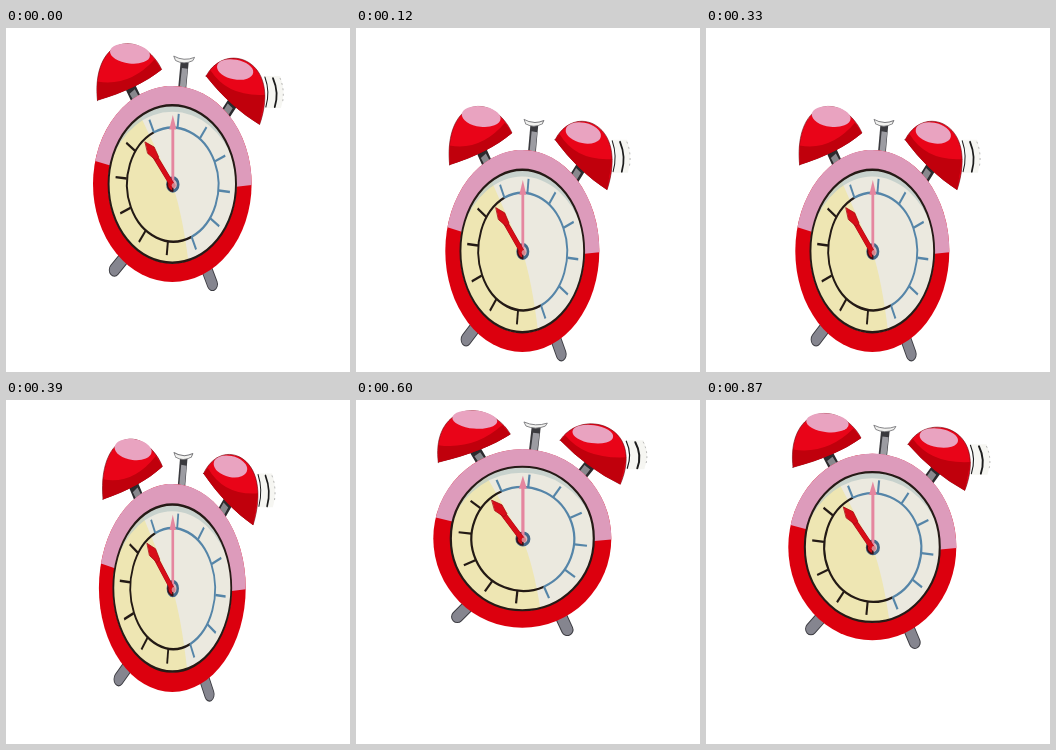
Animation, 344 px wide and 344 px high, one loop 0.9 s. Source, as an HTML page:

```html
<!DOCTYPE html>
<html lang="en">
<head>
<meta charset="utf-8">
<title>Bouncing alarm clock</title>
<style>
  html, body { margin: 0; width: 100%; height: 100%; overflow: hidden; background: #fff; }
  svg { display: block; width: 100vw; height: 100vh; }
</style>
</head>
<body>
<svg viewBox="0 0 344 344">
  <g id="clock" stroke-linecap="round" stroke-linejoin="round">
    <!-- feet -->
    <g fill="none">
      <path d="M-54 67L-65 78M38 76L45 91" stroke="#3c3c42" stroke-width="12.5"/>
      <path d="M-54 67L-65 78M38 76L45 91" stroke="#85858f" stroke-width="10.5"/>
    </g>

    <!-- bell stems and top post -->
    <g fill="none" stroke-linecap="butt">
      <path d="M-47 -88L-37 -71M68 -74L55 -58" stroke="#2b2b2e" stroke-width="11.5"/>
      <path d="M-45 -84L-36 -71M65 -71L55 -58" stroke="#88888d" stroke-width="7"/>
      <path d="M14 -112L11 -86" stroke="#3a3a3e" stroke-width="9"/>
      <path d="M14 -105L11.5 -86" stroke="#9c9ca2" stroke-width="6.5"/>
    </g>
    <path d="M2 -116Q13 -111 25 -115L23 -112Q13 -108 4 -112Z" fill="#f2f2f0" stroke="#77777a" stroke-width=".9"/>

    <!-- ringing marks -->
    <path d="M103 -98H121Q128 -84 122 -69H105Q113 -84 103 -98Z" fill="#f6f6f2"/>
    <g fill="none" stroke="#1c1c1c">
      <path d="M104 -97Q110 -84 105 -70" stroke-width="1.2"/>
      <path d="M113 -96Q120 -83 115 -70" stroke-width="2"/>
      <path d="M121 -96Q127 -84 123 -72" stroke="#888" stroke-width=".6" stroke-dasharray="1 4"/>
    </g>

    <!-- bells -->
    <g stroke="#6c000a" stroke-width=".6" fill="#e90418">
      <path d="M-84 -76C-87 -98 -80 -117 -63 -125C-43 -133 -21 -120 -12 -104Q-38 -87 -84 -76Z"/>
      <path d="M38 -98C47 -112 65 -118 82 -112C103 -104 110 -82 98 -54Q65 -70 38 -98Z"/>
    </g>
    <path d="M-84 -76L-84 -93Q-48 -88 -20 -113L-12 -104Q-38 -87 -84 -76Z" fill="#c0000c"/>
    <path d="M38 -98L43 -103Q62 -79 104 -81L98 -54Q65 -70 38 -98Z" fill="#c0000c"/>
    <g fill="#e9a3c0">
      <ellipse cx="-47.5" cy="-118.5" rx="22.5" ry="9" transform="rotate(5 -47.5 -118.5)"/>
      <ellipse cx="70.5" cy="-104" rx="20.5" ry="9" transform="rotate(8 70.5 -104)"/>
    </g>

    <!-- body -->
    <circle r="89" fill="#dc000e"/>
    <path d="M0 0L-86.5 -21A89 89 0 0 1 89 1L72 2.5Z" fill="#dd9bbb"/>

    <!-- face -->
    <circle r="72" fill="#ebe9df"/>
    <path d="M0 0Q11 26 18 69.7A72 72 0 0 1 -36 -62.3Z" fill="#eee6b3"/>
    <path d="M-69 -20A72 72 0 0 1 69 -20A75 75 0 0 0 -69 -20Z" fill="#b9c9c6" opacity=".7"/>
    <circle r="71.5" fill="none" stroke="#261a16" stroke-width="2.2"/>
    <g id="dial" fill="none" stroke-width="2.2" stroke-linecap="butt" transform="translate(.5 .5)"></g>

    <!-- hub and hands -->
    <g transform="translate(.6 .4)">
      <circle r="6" fill="#d9b9bd" stroke="#44698a" stroke-width="3"/>
      <path d="M0 -6A6 6 0 0 0 0 6Z" fill="#d50d18" stroke="#3b1014" stroke-width="1.6"/>
      <path d="M0 0V-52" stroke="#e5869f" stroke-width="3.2"/>
      <path d="M0 -63L4 -50H-4Z" fill="#e5869f"/>
      <path d="M-1 0L-22 -28" stroke="#a80a14" stroke-width="5.4"/>
      <path d="M-1 0L-22 -28" stroke="#d80d18" stroke-width="4.4"/>
      <path d="M-31 -38.5L-21 -34L-16 -25L-19 -22L-28 -28Z" fill="#d80d18" stroke="#a80a14" stroke-width=".8"/>
      <circle cx="1" cy="1" r="2.3" fill="#d8838c"/>
    </g>
  </g>
</svg>
<script>
const clock = document.getElementById('clock');
const dial = document.getElementById('dial');
const BLUE = '#5585a8', BLACK = '#231a15';

function polar(r, deg) {
  const a = deg * Math.PI / 180;
  return `${(r * Math.sin(a)).toFixed(2)} ${(-r * Math.cos(a)).toFixed(2)}`;
}

function stroke(d, color) {
  const p = document.createElementNS('http://www.w3.org/2000/svg', 'path');
  p.setAttribute('d', d);
  p.setAttribute('stroke', color);
  dial.append(p);
}

const arc = (a, b) => `M${polar(52, a)}A52 52 0 0 1 ${polar(52, b)}`;
stroke(arc(-24, 156), BLUE);
stroke(arc(156, 336), BLACK);
for (let i = 0; i < 12; i++) {
  const deg = 6 + 30 * i;
  stroke(`M${polar(52, deg)}L${polar(64.5, deg)}`, deg > 170 && deg < 320 ? BLACK : BLUE);
}

// Steps away from the top of the bounce, then [value, slope] of centre y, rx and ry.
const poses = [
  [0.5,  [137.5, 0], [89.5, 0],   [88.5, 0]],
  [2.5,  [138.5, .5], [89, -.4],  [89.3, .4]],
  [6.5,  [147, 7],   [84, -3.5],  [93.3, 3.5]],
  [7.5,  [156, 13],  [79.3, -4.5], [98, 4]],
  [11.5, [223, 16],  [77, 5],     [101, -5]],
  [14.5, [258.7, 4], [100.3, 4],  [77.8, -4]]
];

function hermite([p, m], [q, n], s, h) {
  const s2 = s * s, s3 = s2 * s;
  return p * (2 * s3 - 3 * s2 + 1) + q * (3 * s2 - 2 * s3)
    + h * (m * (s3 - 2 * s2 + s) + n * (s3 - s2));
}

const STEP = 30, STEPS = 30, PEAK = 22.5, R = 89;

function draw(ms) {
  const step = Math.floor(ms / STEP) % STEPS;
  const d = Math.abs(step - PEAK);
  const u = Math.min(d, STEPS - d);
  let i = 0;
  while (i < poses.length - 2 && u > poses[i + 1][0]) i++;
  const a = poses[i], b = poses[i + 1], h = b[0] - a[0];
  const [y, rx, ry] = [1, 2, 3].map(k => hermite(a[k], b[k], (u - a[0]) / h, h));
  clock.setAttribute('transform', `translate(166.3 ${y}) scale(${rx / R} ${ry / R})`);
}

const start = performance.now();
function tick() {
  draw(performance.now() - start);
  requestAnimationFrame(tick);
}
tick();
</script>
</body>
</html>
```
